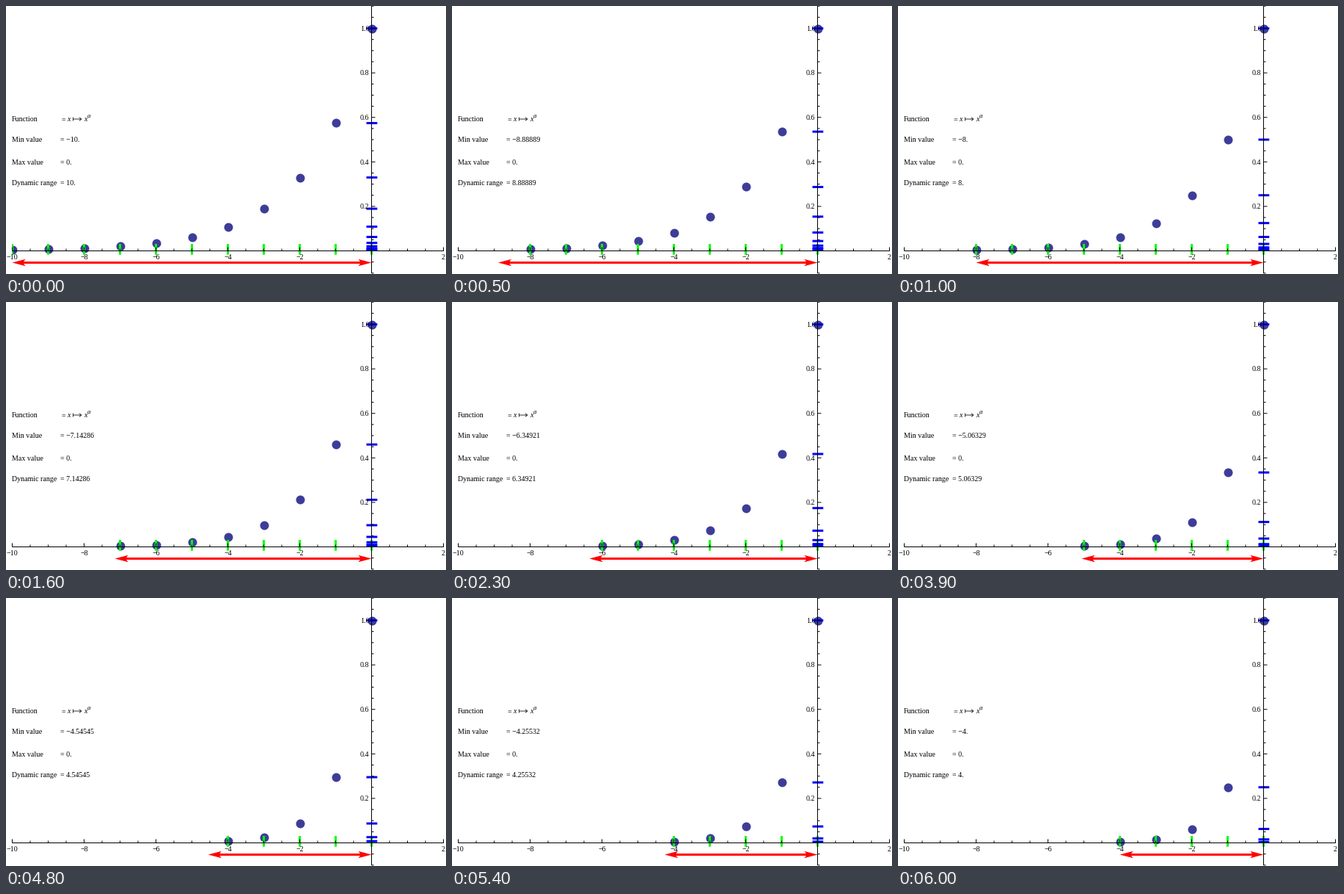
Animation, 600 px wide and 365 px high, one loop 6100 ms. Source, as a matplotlib script:

```python
import matplotlib.pyplot as plt
import numpy as np
from matplotlib.animation import FuncAnimation
from matplotlib.collections import LineCollection
from matplotlib.patches import Polygon, Rectangle

W, H, DPI = 600, 365, 100
PX = 72 / DPI  # points per pixel
FRAMES, INTERVAL = 61, 100
X0, Y0, SX, SY = 498.5, 333.5, 49, 303
ARROW_Y = 349.5

plt.rcParams["font.family"] = "Liberation Serif"
fig = plt.figure(figsize=(W / DPI, H / DPI), dpi=DPI, facecolor="white")
ax = fig.add_axes([0, 0, 1, 1])
ax.set_xlim(0, W)
ax.set_ylim(H, 0)
ax.axis("off")


def to_x(v):
    return X0 + SX * v


def to_y(v):
    return Y0 - SY * v


def segments(color, width, z, segs=()):
    lines = LineCollection(list(segs), colors=color, linewidths=width * PX,
                           zorder=z, capstyle="butt")
    lines.set_snap(False)
    return ax.add_collection(lines, autolim=False)


def label(x, y, s, size=10, **kw):
    return ax.text(x, y, s, fontsize=size * PX, color="black",
                   va="baseline", zorder=8, **kw)


def number(v):
    s = f"{v:.6g}"
    s = s if "." in s else s + "."
    return s.replace("-", "\u2212")


def draw_axes():
    segs = [[(to_x(-10), Y0), (to_x(2) + 0.5, Y0)], [(X0, 0), (X0, 364)]]
    for i in range(-20, 5):
        x, size = to_x(i / 2), 5 if i % 4 == 0 else 3
        segs.append([(x, Y0), (x, Y0 - size)])
        if i % 4 == 0 and i:
            label(x, 344.8, f"{i // 2}".replace("-", "\u2212"), ha="center")
    for i in range(-2, 23):
        y, size = to_y(i / 20), 5 if i % 4 == 0 else 3
        segs.append([(X0, y), (X0 + size, y)])
        if i % 4 == 0 and i > 0:
            label(495.3, y + 3.4, f"{i / 20:.1f}", ha="right")
    segments("black", 1, 7, segs)


def draw_captions():
    rows = ("Function", 156.8), ("Min value", 184.6), ("Max value", 215.5), ("Dynamic range", 244.5)
    for name, y in rows:
        label(8, y, name)
    label(75, 156.8, "=")
    label(83, 156.8, "x", style="italic")
    label(106, 156.8, "x", style="italic")
    label(111, 152.3, "a", 9, style="italic")
    segments("black", 0.8, 8, [
        [(91.5, 154), (102.5, 154)], [(91.5, 151.5), (91.5, 156.5)],
        [(100, 151.8), (102.8, 154)], [(100, 156.2), (102.8, 154)]])
    label(73.5, 215.5, "= 0.")
    return label(73.5, 184.6, ""), label(73.5, 244.5, "")


def head(tip, direction):
    dx = np.array([0, 18, 14.5, 18]) * direction
    dy = np.array([0, -4.7, 0, 4.7])
    return np.column_stack([tip + dx, ARROW_Y + dy])


draw_axes()
min_text, range_text = draw_captions()
dots = ax.scatter([], [], s=(12 * PX) ** 2, color="#3d3d99", linewidths=0, zorder=2)
green = segments("#00ff00", 3, 3)
blue = segments("#0000ff", 3, 4)
shaft = segments("#ff0000", 3, 5)
left_head = ax.add_patch(Polygon(head(to_x(-10), 1), color="#ff0000", lw=0, zorder=5))
ax.add_patch(Polygon(head(X0, -1), color="#ff0000", lw=0, zorder=5))
for part in (dots, green):
    part.set_clip_path(Rectangle((8, 0), W, H, transform=ax.transData))


def update(n):
    # the reciprocal of the range grows evenly from 1/10 to 1/4
    span = 400 / (40 + n)
    v = -np.arange(400 // (40 + n) + 1)
    xs, ys = to_x(v), to_y(256.0 ** (v / span))
    dots.set_offsets(np.column_stack([xs, ys]))
    green.set_segments([[(x, 324), (x, 338.7)] for x in xs])
    blue.set_segments([[(491.5, y), (506.3, y)] for y in ys])
    start = to_x(-span)
    shaft.set_segments([[(start + 14, ARROW_Y), (X0 - 14, ARROW_Y)]])
    left_head.set_xy(head(start, 1))
    min_text.set_text("= " + number(-span))
    range_text.set_text("= " + number(span))
    return dots, green, blue, shaft, left_head, min_text, range_text


anim = FuncAnimation(fig, update, frames=FRAMES, interval=INTERVAL,
                     repeat=True, repeat_delay=0)
plt.show()
```
